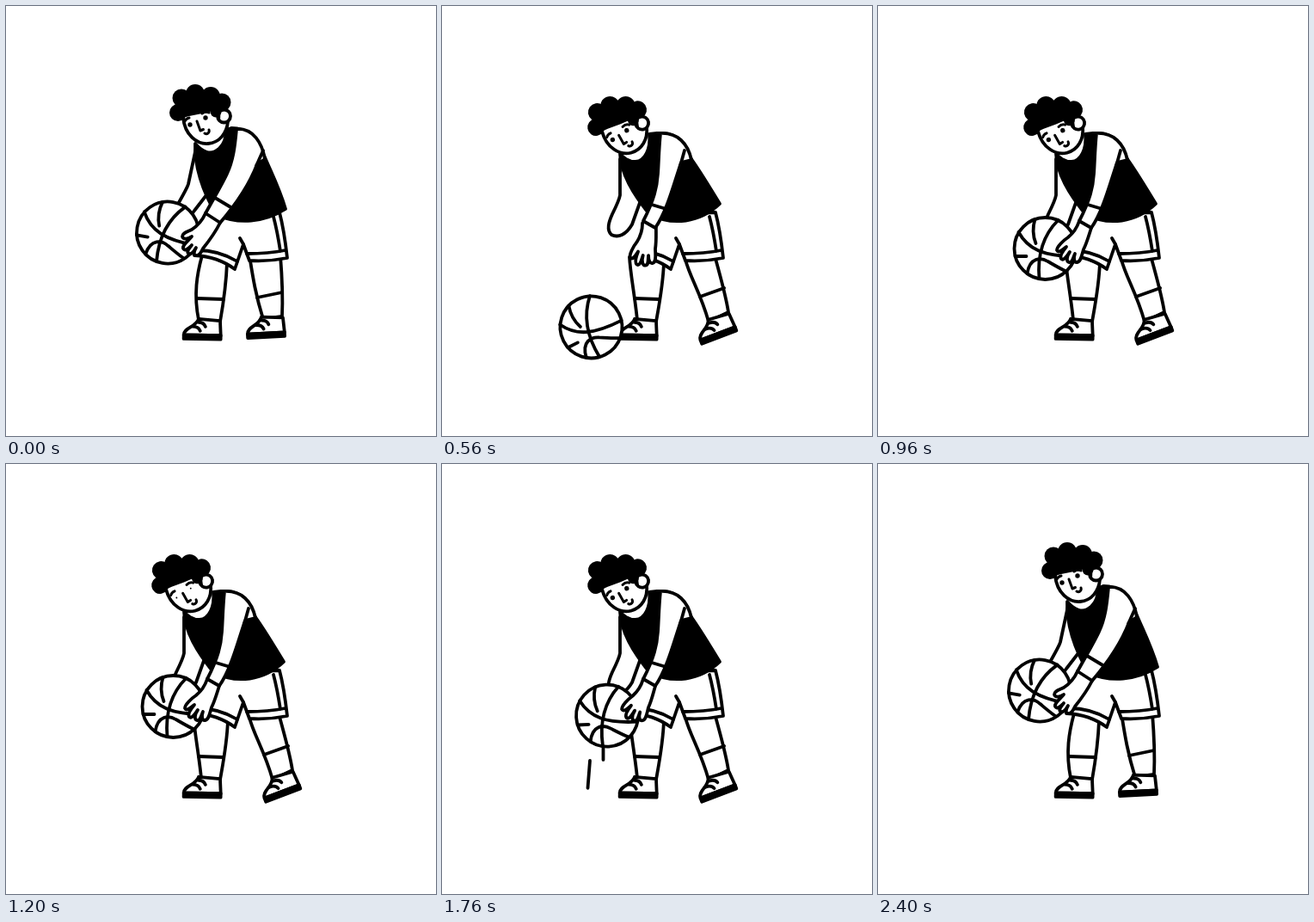
These frames come from a looping animation (500x500 px, 2440 ms). An HTML page with a canvas:

```html
<!DOCTYPE html>
<html lang="en">
<head>
<meta charset="utf-8">
<title>Dribble</title>
<style>
html, body { margin: 0; width: 100%; height: 100%; overflow: hidden; background: #fff; }
canvas { display: block; width: 100vmin; height: 100vmin; }
</style>
</head>
<body>
<canvas id="stage" width="500" height="500"></canvas>
<script>
const ctx = document.getElementById('stage').getContext('2d');
const LOOP = 2440, STEP = 40;

const lerp = (a, b, k) => a + (b - a) * k;
const ease = x => { x = Math.min(1, Math.max(0, x)); return x * x * (3 - 2 * x); };
const ramp = (t, from, to) => ease((t - from) / (to - from));

// Blends two paths that share the same commands.
function blend(a, b, k) {
  const goal = b.match(/-?[\d.]+/g);
  let i = 0;
  return a.replace(/-?[\d.]+/g, n => lerp(+n, +goal[i++], k));
}

function shape(d, fill, stroke = true) {
  const path = new Path2D(d);
  if (fill) { ctx.fillStyle = fill; ctx.fill(path); }
  if (stroke) ctx.stroke(path);
}

function disc(x, y, r, fill = '#000', stroke = false) {
  ctx.beginPath();
  ctx.arc(x, y, r, 0, 7);
  ctx.fillStyle = fill;
  ctx.fill();
  if (stroke) ctx.stroke();
}

function placed(x, y, degrees, draw) {
  ctx.save();
  ctx.translate(x, y);
  ctx.rotate(degrees * Math.PI / 180);
  draw();
  ctx.restore();
}

// Each part holds its upright and its bent outline.
const parts = {
  farArm: [
    'M221,165 L212,207 Q211,211 199,232 C194,242 190,254 196,258 C204,262 212,248 219,238 L236,216',
    'M207,178 L207,220 Q206,226 198,242 C194,251 191,260 197,266 C205,270 214,266 221,254 L231,226'],
  backLeg: [
    'M283,290 C287,315 290,335 299,364 L321,361 C322,340 321,315 319,290',
    'M283,295 C289,317 300,332 310,367 L333,356 C330,336 324,316 317,290'],
  backSock: ['M292,339 L321,333', 'M300,338 L328,328'],
  frontLeg: [
    'M228,290 C222,312 218,335 224,365 L249,367 C252,350 256,325 257,298',
    'M218,292 C219,312 224,335 227,365 L249,367 C252,350 257,325 258,298'],
  frontSock: ['M222,340 L253,341', 'M224,340 L253,341'],
  vest: [
    'M220,160 C219,185 228,215 245,243 C270,254 300,252 325,236 C318,212 309,195 301,176 C290,150 280,142 262,142 L256,144 C256,165 242,172 234,170 C226,168 222,162 220,160Z',
    'M207,172 C208,195 222,218 241,242 C268,256 300,252 323,230 C312,212 302,195 290,178 C278,152 268,147 250,148 L241,149 C243,166 236,180 225,181 C216,181 211,176 207,172Z'],
  arm: [
    'M268,143 C266,165 264,180 257,195 C252,206 246,216 232,241 L249,252 C268,230 284,205 292,184 L301,178 C298,160 288,142 268,143',
    'M254,148 C252,168 252,182 251,195 C250,210 247,225 234,250 L248,258 C262,238 270,205 278,182 L290,179 C286,160 274,147 254,148'],
  armpit: ['M299,168 L291,186', 'M282,168 L277,186'],
  band: ['M243,223 L263,235', 'M244,231 L264,237'],
  hand: [
    'M232,241 C228,250 222,256 216,260 C210,263 205,264 205,268 C206,272 212,271 216,268 C211,274 205,278 206,282 C208,286 213,281 216,278 C211,284 210,287 213,288 C217,289 219,284 221,281 C218,286 218,290 221,290 C225,291 227,286 229,282 C237,272 244,262 249,252',
    'M234,250 C231,259 226,265 221,269 C215,273 208,280 208,284 C210,288 215,283 219,280 C214,286 211,291 213,294 C216,297 220,290 223,286 C219,292 219,297 222,298 C226,299 227,292 229,288 C227,294 228,298 231,298 C236,298 237,289 239,283 C243,275 245,267 248,258']
};

function shoe(x, y, degrees) {
  placed(x, y, degrees, () => {
    shape('M-30,17 C-30,8 -16,8 -13,-2 L12,0 L13,17Z', '#fff');
    shape('M-30,17 L13,17 L13,21.5 L-30,21.5Z', '#000');
    shape('M-20,7 C-15,7 -12,9 -11,12 M-13,2 C-9,2 -6,4 -5,7');
  });
}

function shorts() {
  shape('M242,242 C238,262 230,276 219,290 C238,291 254,297 266,306 L276,277 L283,296 C298,297 312,296 327,293 C325,275 322,255 318,240Z', '#fff');
  shape('M222,284 C240,284 256,289 269,297 M280,288 C296,288 310,287 325,284 M311,245 C315,260 317,272 319,285 M276,277 L272,270');
}

function head(bend, eyeSize) {
  placed(lerp(227, 206.5, bend), lerp(128, 140.5, bend), -9.5 * bend, () => {
    ctx.translate(-227, -128);
    shape('M206,130 C208,150 222,161 235,160 C248,159 257,148 258,134 L250,112 L210,115Z', '#fff');
    disc(253.5, 128, 7.5, '#fff', true);
    const curls = [[200, 124, 10], [204, 107, 10.5], [220, 102, 11], [238, 105, 11], [251, 112, 10.5], [244, 123, 6.5]];
    curls.forEach(c => disc(...c));
    shape('M200,105 L250,110 L249,134 L241,122 L228,125 L213,128 L202,131Z', '#000', false);
    ctx.translate(2.5 * bend, 3.5 * bend);
    disc(214, 138, 2.7 * eyeSize);
    disc(232, 130, 2.7 * eyeSize);
    ctx.lineWidth = 3;
    shape('M208,134 Q209,131 213,130 M228,125 Q232,122 236,124 M222,134 L226,145 L229.5,143.5 M231,148 C234,150 237,147 236,144');
  });
}

function ball(x, y, degrees) {
  placed(x, y, degrees, () => {
    disc(0, 0, 36, '#fff', true);
    shape('M15,-33 C-5,-13 -9,12 -7,35 M-31,-19 C-20,1 -2,9 35,9 M-12,-34 C-15,-24 -15,-16 -11,-6 M-35,9 L-22,9 M-21,29 C-18,10 -5,10 3,15 C10,19 15,22 23,26');
  });
}

// Streaks left on the floor side as the ball rises.
function streak(x, tilt, bottom, top, t, start) {
  const y1 = lerp(bottom, top, ramp(t, start, start + 80));
  const y2 = lerp(bottom, top, ramp(t, start + 40, start + 240));
  if (y2 - y1 > 1) shape(`M${x},${y1} L${x - tilt},${y2}`);
}

function draw(t) {
  const bend = ramp(t, 0, 400) - ramp(t, 1800, 2200);
  const beat = t % 1000;
  const dribbling = t >= 400 && t < 1800;
  const drop = dribbling ? ramp(beat, 400, 600) - ramp(beat, 600, 800) : 0;
  const blink = Math.max(0, ...[1200, 2240].map(m => 1 - Math.abs(t - m) / 100));
  const part = (name, fill) => shape(blend(...parts[name], bend), fill);

  ctx.fillStyle = '#fff';
  ctx.fillRect(0, 0, 500, 500);
  ctx.strokeStyle = '#000';
  ctx.lineWidth = 3.8;
  ctx.lineCap = ctx.lineJoin = 'round';

  part('farArm', '#fff');
  part('backLeg', '#fff');
  part('backSock');
  shoe(lerp(310, 322.5, bend), lerp(363, 362, bend), lerp(-3, -21, bend));
  part('frontLeg', '#fff');
  part('frontSock');
  shoe(237, 366, 1);
  shorts();
  part('vest', '#000');
  head(bend, 1 - 0.65 * blink);

  if (dribbling) {
    streak(172, 2.5, 394, 345, beat, 640);
    streak(187.5, 0, 365, 305, beat, 640);
  }
  ball(lerp(lerp(188, 194.5, bend), 171, drop),
       lerp(lerp(263.5, 282, bend), 384, drop),
       lerp(10, 0, bend) - 30 * drop);

  const wrist = [lerp(240, 241, bend), lerp(247, 254, bend)];
  placed(...wrist, -20 * drop, () => {
    ctx.translate(-wrist[0], -wrist[1]);
    part('hand', '#fff');
  });
  part('arm', '#fff');
  part('armpit');
  part('band');
}

const begin = performance.now();
function tick() {
  const t = (performance.now() - begin) % LOOP;
  draw(t - t % STEP);
  requestAnimationFrame(tick);
}
tick();
</script>
</body>
</html>
```
